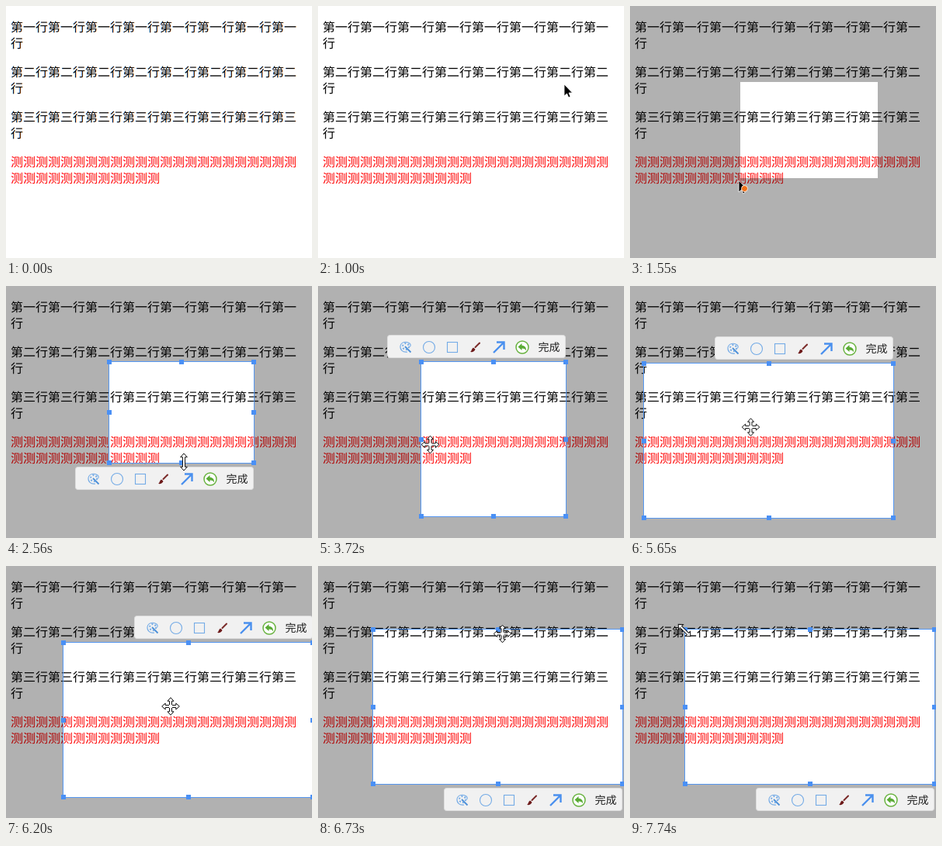
Animation, 394 px wide and 325 px high, one loop 8 s. Source, as an HTML page:

```html
<!DOCTYPE html>
<html lang="zh-CN">
<head>
<meta charset="utf-8">
<title>截图选区</title>
<style>
html, body { margin: 0; width: 100%; height: 100%; overflow: hidden; background: #fff; }
svg { display: block; width: 394px; height: 325px; }
text { font-family: "Noto Sans CJK SC", "Noto Sans CJK", sans-serif; font-size: 16px; text-rendering: geometricPrecision; }
#bar text { font-size: 14px; }
#fringe { isolation: isolate; }
#fringe g { mix-blend-mode: multiply; }
</style>
</head>
<body>
<svg viewBox="0 0 394 325">
  <g id="plain"></g>
  <g id="fringe"><rect width="394" height="325" fill="#fff"/></g>
  <path id="shade" fill="#000" fill-opacity=".305" fill-rule="evenodd"/>
  <g id="frame">
    <rect id="edge" fill="none" stroke="#5597f2"/>
    <path id="grips" fill="#4a90f5"/>
  </g>
  <g id="bar">
    <rect x=".5" y=".5" width="229" height="29" rx="3" fill="#f1f1f1" stroke="#dcdcdc"/>
    <g fill="none" stroke="#74abe6" stroke-width="1.1">
      <path d="M26 22C20 23 16.500 19 17 14.500 18 9 25 8 29 11 31 13 30.500 15.500 28 15.500"/>
      <path d="M23 15L30.500 22.500" stroke="#4c8fd8" stroke-width="1.800"/>
      <circle cx="24" cy="15" r="4" stroke-width="2" stroke-dasharray="2 2.200"/>
      <circle cx="54" cy="16" r="7.500"/>
      <rect x="77.500" y="9.500" width="13" height="13"/>
    </g>
    <path d="M113.500 16L119 10.500" stroke="#7a2a28" stroke-width="2" stroke-linecap="round"/>
    <path d="M107 22C109 21 108.500 18 111 16.500L113.500 18.500C112.500 22 109.500 22.500 107 22Z" fill="#6d1a1a"/>
    <path d="M137 23L149.500 10.500M141 9.500H150.500V19" fill="none" stroke="#4a90ee" stroke-width="2.400"/>
    <circle cx="174" cy="16" r="8" fill="#fff" stroke="#68b23f" stroke-width="1.500"/>
    <path d="M168.500 15.500L173.500 11V13.700C177 13.700 179.300 16 179 20.300 177.500 18 176 17.400 173.500 17.500V20Z" fill="#5aab35"/>
    <text x="194.500" y="21.300" fill="#222">完成</text>
  </g>
  <g id="cursor"></g>
</svg>
<script>
const LOOP = 8000, STEP = 76;
const $ = id => document.getElementById(id);

// Page text: 23 characters fit on a line.
function rows(dark, red, dx) {
  const paras = [..."一二三"].map(n => [`第${n}行`.repeat(8), dark]);
  paras.push(["测".repeat(35), red]);
  return paras.map(([s, fill], i) => [s.slice(0, 23), s.slice(23)].map((line, j) =>
    `<text x="${6 + dx}" y="${33 + i * 58 + j * 21}" fill="${fill}">${line}</text>`).join("")).join("");
}
$("plain").innerHTML = rows("#000", "#f00", 0);
// One ink per colour channel, each a third of a pixel apart.
$("fringe").innerHTML += [["#0ff", "none", -.33], ["#f0f", "#f0f", 0], ["#ff0", "#ff0", .33]]
  .map(ink => `<g>${rows(...ink)}</g>`).join("");

// Cursors
const white = 'fill="#fff" stroke="#111"';
const arrow = '<path d="M0 0V15L3.500 12 5.700 17 8 16 6 11H10.500Z" fill="#000" stroke="#fff" stroke-width=".8"/>';
const double = turn => `<path transform="rotate(${turn})" ${white} d="M0-11L4.300-6.300H1.500V6.300H4.300L0 11-4.300 6.300H-1.500V-6.300H-4.300Z"/>`;
function cross() {
  const arm = "-1.5 -1.5L-1.5 -6.8H-4L0 -11.3 4 -6.8H1.5L1.5 -1.5";
  const arms = [0, 90, 180, 270].map(a => `<path transform="rotate(${a})" ${white} d="M${arm}"/>`);
  return arms.join("") + '<path d="M-2-2H2V2H-2Z" fill="#fff"/>';
}
const cursors = {
  none: "",
  arrow,
  snip: arrow + '<circle cx="7.500" cy="10.500" r="4" fill="#f07018" stroke="#fff" stroke-width=".8"/>',
  move: cross(),
  ns: double(0),
  ew: double(90),
  nwse: double(-45)
};

// Pointer moves: start, end, target x and y, shape, dragged sides
const moves = [
  [150, 300, 291, 178, "arrow"],
  [530, 1000, 317, 101, "arrow"],
  [1170, 1550, 140, 225, "snip", "lb"],
  [1630, 1630, 131, 231, "snip", "lb"],
  [1780, 2160, 222, 224, "move"],
  [2240, 2240, 229, 227, "ns"],
  [2640, 3100, 222, 296, "ns", "b"],
  [3400, 3720, 144.5, 204.5, "move"],
  [3800, 3950, 138, 201.5, "move"],
  [4100, 4170, 130, 199, "ew"],
  [4410, 4800, 26, 196, "ew", "l"],
  [4880, 4950, -5, 195, "ew", "l"],
  [5350, 5570, 136, 180, "move"],
  [5650, 5880, 214, 188, "move", "ltrb"],
  [6030, 6190, 212, 181, "move", "ltrb"],
  [6270, 6420, 209, 164, "move", "ltrb"],
  [6500, 6580, 237.5, 89.5, "move"],
  [6730, 6800, 237.5, 85.5, "move"],
  [6970, 7490, 77.5, 83.5, "move"],
  [7640, 7740, 70, 83, "nwse"]
];

// Plays all moves up to t; a dragged side follows the pointer.
function stateAt(t) {
  const s = { x: 321, y: 320, shape: "none", l: 319, t: 98, r: 319, b: 98 };
  for (const [from, to, x, y, shape, sides = ""] of moves) {
    if (t < from) break;
    const n = Math.round((to - from) / STEP) + 1;
    const p = Math.min(1, (Math.floor((t - from) / STEP) + 1) / n);
    const dx = (x - s.x) * p, dy = (y - s.y) * p;
    s.x += dx;
    s.y += dy;
    s.shape = shape;
    for (const side of sides) s[side] += "lr".includes(side) ? dx : dy;
  }
  return s;
}

const show = (id, on) => $(id).setAttribute("display", on ? "inline" : "none");
const place = (id, x, y) => $(id).setAttribute("transform", `translate(${x} ${y})`);

function drawArea(l, top, r, b, pad) {
  $("shade").setAttribute("d", "M0 0H394V325H0Z" +
    (r > l ? `M${l - pad} ${top - pad}H${r + pad}V${b + pad}H${l - pad}Z` : ""));
  const box = { x: l - .5, y: top - .5, width: r - l + 1, height: b - top + 1 };
  for (const k in box) $("edge").setAttribute(k, box[k]);
  const mx = Math.round((l + r) / 2), my = Math.round((top + b) / 2);
  let d = "";
  for (const x of [l, mx, r])
    for (const y of [top, my, b])
      if (x !== mx || y !== my) d += `M${x - 3} ${y - 3}h6v6h-6Z`;
  $("grips").setAttribute("d", d);
  // The toolbar sits below the area, or above it when there is no room.
  place("bar", r - 230, b + 35 <= 325 ? b + 5 : top - 35);
}

let shape = "";
function draw(t) {
  const s = stateAt(t), framed = t >= 1780;
  show("fringe", t < 760);
  show("shade", t >= 1170);
  show("frame", framed);
  show("bar", framed);
  drawArea(...[s.l, s.t, s.r, s.b].map(Math.round), framed ? 1 : 0);
  if (s.shape !== shape) $("cursor").innerHTML = cursors[shape = s.shape];
  place("cursor", Math.round(s.x * 2) / 2, Math.round(s.y * 2) / 2);
}

const start = performance.now();
function loop() {
  draw((performance.now() - start + 4) % LOOP);
  requestAnimationFrame(loop);
}
loop();
</script>
</body>
</html>
```
